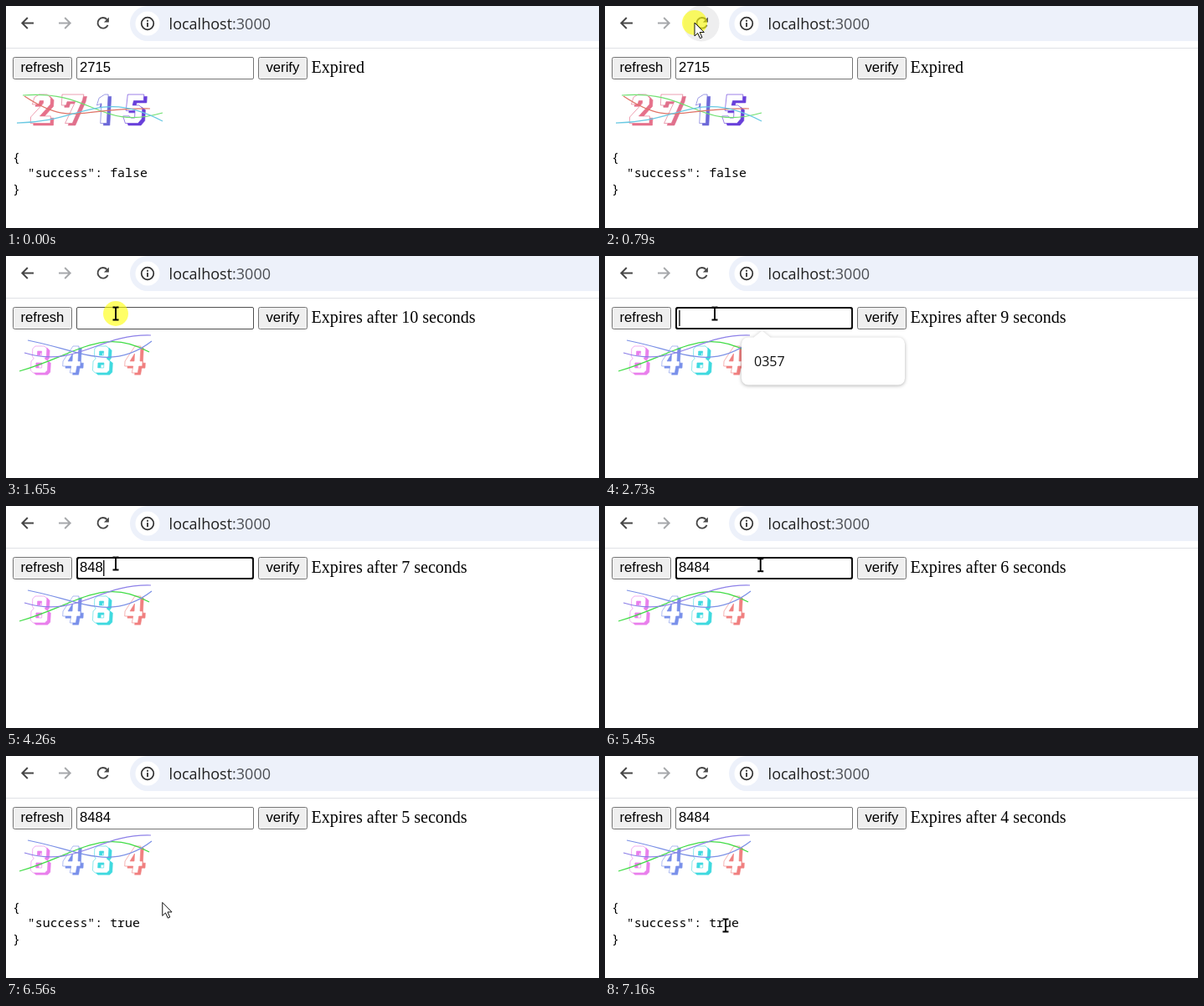
Recreate the animation shown at these times as an HTML page. Size 708x266 px, loop 8 s.

```html
<!DOCTYPE html>
<html lang="en">
<head>
<meta charset="utf-8">
<title>Captcha demo</title>
<style>
  html, body { margin: 0; width: 100%; height: 100%; overflow: hidden; background: #fff; }
  svg { display: block; width: 708px; height: 266px; }
  text { white-space: pre; }
  .url { font: 18px "Open Sans", "Noto Sans", sans-serif; }
  .hint { font: 16px "Open Sans", "Noto Sans", sans-serif; fill: #111; }
  .ui { font: 16.667px "Liberation Sans", Arial, sans-serif; }
  .serif { font: 20px "Liberation Serif", "Times New Roman", serif; }
  .mono { font: 14.9px "Noto Sans Mono", "DejaVu Sans Mono", monospace; }
  .line { fill: none; }
  .box { fill: #efefef; stroke: #767676; }
  .box.hover { stroke: #4f4f4f; }
  #verifyBox.hover { fill: #e5e5e5; }
  #field { fill: #fff; }
  #popup { filter: drop-shadow(0 1px 2px rgba(0, 0, 0, .3)); }
</style>
</head>
<body>
<svg viewBox="0 0 708 266">
  <rect y="50" width="708" height="1" fill="#dfe1e5"/>
  <rect x="148" width="620" height="42" rx="21" fill="#edf1fa"/>
  <circle id="reloadHover" cx="115" cy="21" r="21.5" fill="#eeeeef"/>
  <g class="line" stroke-width="1.9">
    <path d="M33 20.5H19.5M25.8 14l-6.5 6.5 6.5 6.5" stroke="#474747"/>
    <path d="M63 20.5h13.5M70.2 14l6.5 6.5-6.5 6.5" stroke="#a6a8ab"/>
    <path d="M121.6 22.8A6.3 6.3 0 1 1 120.4 16" stroke="#474747"/>
  </g>
  <path d="M122.9 13.5v6h-6z" fill="#474747"/>
  <circle cx="169" cy="21" r="14.5" fill="#fff"/>
  <circle cx="169" cy="21" r="7.3" class="line" stroke="#333" stroke-width="1.7"/>
  <path d="M169 20v5M169 16.8v1.9" stroke="#333" stroke-width="1.8"/>
  <text class="url" x="194.6" y="27.5" fill="#1f1f1f">localhost<tspan fill="#4c4f54">:3000</tspan></text>

  <rect class="box" x="8.5" y="61.5" width="70" height="26" rx="2"/>
  <text class="ui" x="17.5" y="79">refresh</text>
  <rect class="box" id="field" x="84.5" y="61.5" width="211" height="26" rx="1.5"/>
  <rect class="line" id="focus" x="85" y="62" width="210" height="25" rx="2.5" stroke="#101010" stroke-width="2"/>
  <text class="ui" id="value" x="88" y="79"></text>
  <rect id="caret" y="65" width="1.3" height="19"/>
  <rect class="box" id="verifyBox" x="301.5" y="61.5" width="58" height="26" rx="2"/>
  <text class="ui" x="310.5" y="79">verify</text>
  <text class="serif" id="status" x="364.6" y="79.5"></text>

  <g id="oldCaptcha"></g>
  <g id="newCaptcha"></g>

  <g class="mono" id="result">
    <text x="8" y="185.5">{</text>
    <text id="success" x="8" y="205.3"></text>
    <text x="8" y="223.5">}</text>
  </g>

  <g id="popup">
    <path d="M171 97.5h6.5l10-8 10 8H350a8 8 0 0 1 8 8V146.5a8 8 0 0 1-8 8H171a8 8 0 0 1-8-8V105.5a8 8 0 0 1 8-8z" fill="#fff"/>
    <text class="hint" x="178" y="132">0357</text>
  </g>

  <g id="pointer">
    <circle id="press" r="15" fill="#ff0" opacity=".6"/>
    <path id="arrow" d="M0 0V16l3.7-3.5 2.8 6.2 2.5-1.1-2.8-6.1H11.3z" fill="#fff" stroke="#111"/>
    <path id="ibeam" class="line" d="M-3.5-7.5h2.5q1 0 1 1V6.5q0 1-1 1h-2.5M3.5-7.5H1q-1 0-1 1V6.5q0 1 1 1h2.5" stroke="#000" stroke-width="1.9"/>
  </g>
</svg>
<script>
const LOOP = 8000;
const $ = id => document.getElementById(id);

// Blocky digit outlines, about 22 by 32 units
const shapes = {
  1: "M4 4L10 0H14V32H7V10L2 12Z",
  2: "M1 11L3 3L8 0H17L21 4V11L10 24H22V32H0V25L13 10V7H9L8 11Z",
  4: "M11 0H18V18H21V24H17L16 32H9L10 24H0V18ZM11 9V18H6Z",
  5: "M4 0H22V7H11L10 12H17L21 15V27L17 32H3L0 24H7L9 26H13V18H3Z",
  7: "M0 0H24L23 6L13 32H5L15 8H6L5 12H0Z",
  8: "M4 0H15L18 3V12L16 15L20 18V29L17 32H3L0 29V18L3 15L1 12V3ZM7 6H12V11H7ZM6 20H13V26H6Z",
};

function drawCaptcha(id, top, scale, digits, curves) {
  const glyphs = digits.map(([char, x, color]) => {
    const layer = (shift, fill) =>
      `<path d="${shapes[char]}" transform="translate(${shift})" fill="${fill}" fill-rule="evenodd" stroke="${color}" stroke-width=".6"/>`;
    return `<g transform="translate(${x} ${top}) scale(${scale}) skewX(-3)">${layer("3.4 2.2", color)}${layer("0 0", "#fff")}</g>`;
  });
  const lines = curves.map(([d, color]) => `<path class="line" d="${d}" stroke="${color}" stroke-width="1.25"/>`);
  $(id).innerHTML = glyphs.concat(lines).join("");
}

drawCaptcha("oldCaptcha", 106, 1.08,
  [["2", 31, "#e6708a"], ["7", 67, "#e0708c"], ["1", 107, "#6c68d8"], ["5", 141, "#683fda"]],
  [["M20 107C105 100 110 150 187 128", "#6fe070"],
   ["M22 108C78 145 85 122 172 123", "#df7366"],
   ["M13 140C90 140 110 98 187 138", "#68c8e2"]]);
drawCaptcha("newCaptcha", 108, 1,
  [["8", 31, "#e97fec"], ["4", 69, "#7a90ea"], ["8", 105, "#40dadf"], ["4", 143, "#f08080"]],
  [["M16 138C85 118 115 84 171 115", "#3fdc44"],
   ["M26 101C85 112 125 140 174 102", "#7b90e6"],
   ["M22 116C85 135 110 93 173 95", "#8d80e8"]]);

// [start, end, steps, from, to]
const moves = [
  [110, 720, 10, [378, 144], [107, 20]],
  [920, 1400, 7, [107, 20], [131, 69]],
  [5310, 5720, 6, [131, 69], [342, 75.5]],
  [6050, 6700, 10, [342, 75.5], [144, 203]],
];
// [time, value]: each value holds until the next time
const values = [[0, "2715"], [980, ""], [3340, "8"], [3850, "84"], [4260, "848"], [4580, "8484"]];
const statuses = [[0, "Expired"], [980, ""], [1060, 10], [2060, 9], [3060, 8], [4080, 7], [5060, 6], [6050, 5], [7020, 4]];
const results = [[0, "false"], [980, ""], [5910, "true"]];
const carets = [[0, false], [1720, true], [2200, false], [2730, true], [3250, false], [3340, true], [5120, false]];
const presses = [[790, 870], [1650, 1720], [5780, 5850], [7090, 7160]];

const held = (table, t) => table.filter(([time]) => time <= t).pop()[1];
const within = (t, a, b) => t >= a && t < b;
const show = (id, on) => { $(id).style.display = on ? "" : "none"; };

function pointerAt(t) {
  const [start, end, steps, from, to] = moves.filter(m => m[0] <= t).pop() || moves[0];
  const p = Math.min(1, Math.max(0, Math.floor((t - start) / (end - start) * steps + 1e-6) / steps));
  const eased = p * p * (3 - 2 * p);
  return from.map((v, i) => v + (to[i] - v) * eased);
}

function render(t) {
  const [x, y] = pointerAt(t);
  const inRow = y >= 61 && y < 88;
  const onField = inRow && x >= 84 && x < 296;
  const onVerify = inRow && x >= 301 && x < 360;
  const onText = t > 6050 && x < 160 && y > 192;

  show("pointer", t >= 110);
  $("pointer").setAttribute("transform", `translate(${x} ${y})`);
  show("press", presses.some(([a, b]) => within(t, a, b)));
  show("ibeam", onField || onText);
  show("arrow", !onField && !onText);
  show("reloadHover", t >= 110 && Math.hypot(x - 115, y - 21) < 21);
  $("field").classList.toggle("hover", onField);
  $("verifyBox").classList.toggle("hover", onVerify);

  const value = held(values, t);
  $("value").textContent = value;
  show("focus", within(t, 1720, 5780));
  show("caret", within(t, 1720, 5780) && held(carets, t));
  $("caret").setAttribute("x", 88.3 + value.length * 9.27);
  show("popup", within(t, 1820, 3340));

  const status = held(statuses, t);
  $("status").textContent = typeof status === "number" ? `Expires after ${status} seconds` : status;
  const success = held(results, t);
  show("result", success);
  $("success").textContent = `  "success": ${success}`;
  show("oldCaptcha", t < 980);
  show("newCaptcha", t >= 1060);
}

const begin = performance.now();
function tick() {
  render((performance.now() - begin) % LOOP);
  requestAnimationFrame(tick);
}
tick();
</script>
</body>
</html>
```
